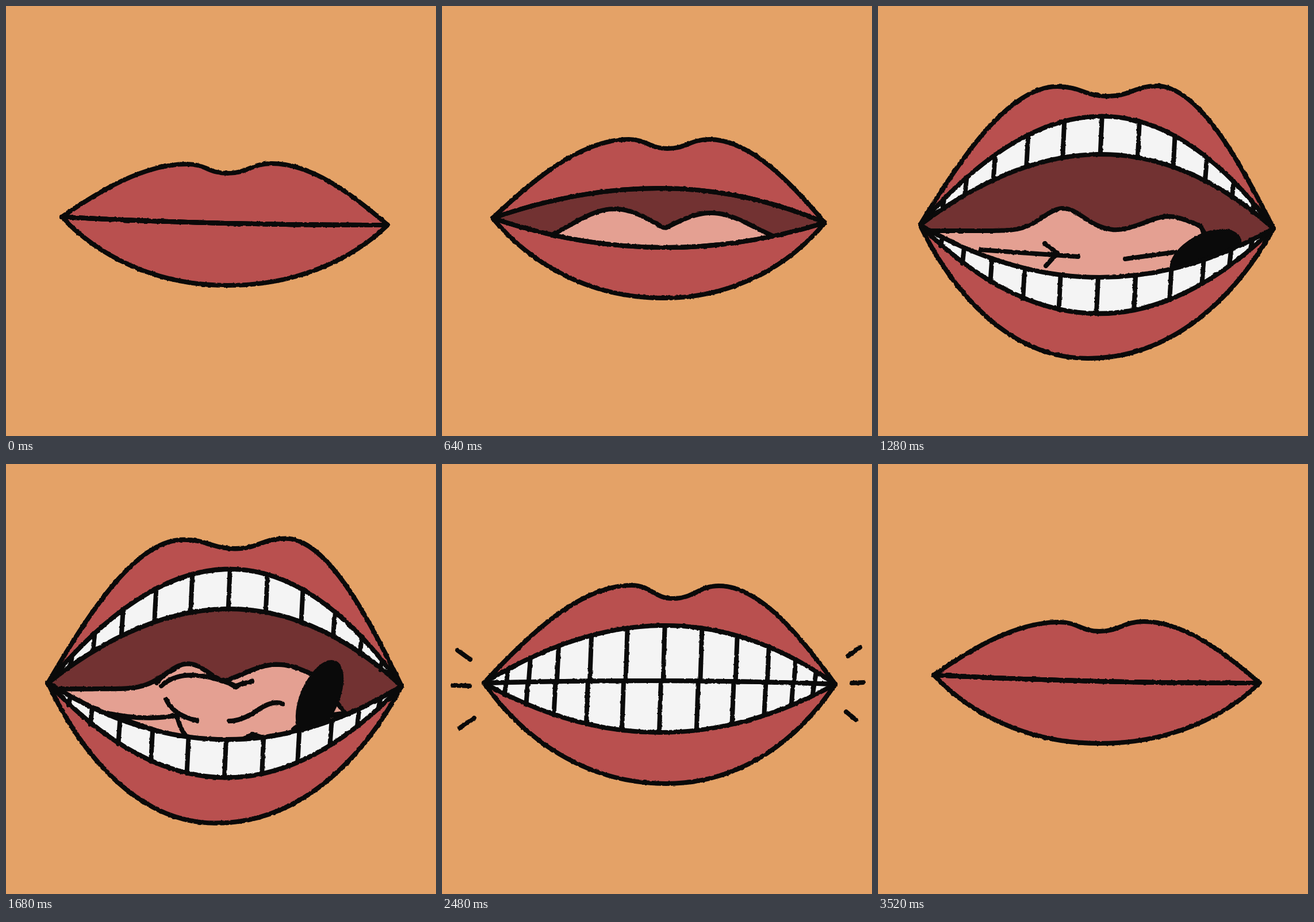
An HTML page for the animation above (3600 ms loop, 748x748 px).

```html
<!DOCTYPE html>
<html lang="en">
<head>
<meta charset="utf-8">
<title>Lips</title>
<style>
  html, body { margin: 0; height: 100%; overflow: hidden; background: #e4a267; }
  svg { display: block; width: 100vw; height: 100vh; }
  .ink { fill: none; stroke: #0a0a0a; stroke-width: 8; stroke-linecap: round; stroke-linejoin: round; }
  .lip { fill: #b9504f; }
  .dark { fill: #723232; }
  .skin { fill: #e4a092; }
  .tooth { fill: #f4f4f4; }
  .fine { stroke-width: 5; }
</style>
</head>
<body>
<svg viewBox="0 0 748 748">
  <filter id="rough" filterUnits="userSpaceOnUse" x="0" y="0" width="748" height="748" color-interpolation-filters="sRGB">
    <feTurbulence type="fractalNoise" baseFrequency=".15" numOctaves="2"/>
    <feDisplacementMap in="SourceGraphic" scale="3" xChannelSelector="R" yChannelSelector="G"/>
  </filter>
  <g id="art" filter="url(#rough)"></g>
</svg>
<script>
const LOOP = 3600, STEP = 80;
const art = document.getElementById('art');
const noise = document.querySelector('feTurbulence');

// x,y of left corner, right corner, left peak, dip, right peak, bottom;
// then the sag of upper gum, upper teeth, lower teeth, lower gum
const closed = [97, 367, 664, 381, 315, 275, 385, 291, 462, 274, 385, 486, 4, 4, 4, 4];
const parted = [88, 369, 666, 377, 325, 232, 392, 248, 465, 232, 385, 508, -56, -56, 47, 47];
const open = [73, 381, 688, 387, 312, 140, 400, 157, 485, 139, 365, 613, -192, -126, 88, 151];
const wide = [73, 381, 688, 385, 305, 140, 397, 153, 488, 137, 365, 621, -196, -128, 98, 163];
const smile = [73, 381, 684, 383, 330, 211, 402, 234, 482, 212, 390, 556, -101, -5, -5, 85];
const pout = [78, 374, 664, 386, 300, 260, 377, 280, 460, 258, 385, 509, -8, -8, -8, -8];
const mouthKeys = [[0, closed], [640, parted], [1280, open], [2160, wide], [2240, wide], [2400, smile],
  [2680, smile], [2880, pout], [3040, pout], [3360, closed]];

// base line, right end, then centre, height and width of two humps
const bodyKeys = [[640, [425, 620, 300, 72, 110, 468, 65, 110]],
  [1280, [391, 560, 322, 39, 50, 505, 25, 55]],
  [2000, [391, 525, 312, 45, 58, 445, 54, 110]]];
// centre, radii and angle
const hairKeys = [[640, [640, 500, 68, 38, -28]], [1280, [570, 434, 68, 38, -28]], [2000, [526, 383, 68, 30, -95]]];

const curled = 'M178 424Q265 430 348 436M290 413L312 430L292 452M430 440L517 428';
const stretched = `M262 381Q272 366 293 358M270 386Q310 350 400 386L428 378M378 376L400 388L412 381
  M278 408Q292 436 332 444M388 445Q410 445 437 427T481 416M172 431Q240 446 300 435
  M298 438Q305 468 325 480M185 435Q240 455 300 473M500 458Q540 436 590 432M408 478L428 467L450 474`;
const sparks = 'M27 324L49 340M19 385L48 386M31 459L56 442M706 334L727 319M713 381L733 380M703 431L720 445';

const lerp = (a, b, k) => a + (b - a) * k;
const path = (d, cls) => `<path class="${cls}" d="${d}"/>`;

function track(keys, t) {
  const i = keys.findIndex(key => key[0] > t);
  if (i === 0) return keys[0][1];
  if (i < 0) return keys[keys.length - 1][1];
  const [t0, a] = keys[i - 1], [t1, b] = keys[i];
  return a.map((v, j) => lerp(v, b[j], (t - t0) / (t1 - t0)));
}

// Cubic segment whose handles are given as fractions of the way from a to b
function arc(a, b, h1, h2) {
  const between = h => a.map((v, k) => lerp(v, b[k], h[k]));
  return `C${between(h1)} ${between(h2)} ${b}`;
}

function figure(t) {
  const [base, end, c1, h1, w1, c2, h2, w2] = track(bodyKeys, t);
  const hump = (x, c, h, w) => h * Math.exp(-(((x - c) / w) ** 2));
  let body = '';
  for (let x = 85; x <= end; x += 5) {
    body += `${body ? 'L' : 'M'}${x} ${base - Math.max(hump(x, c1, h1, w1), hump(x, c2, h2, w2))}`;
  }
  body += 'L590 432';

  const [x, y, rx, ry, angle] = track(hairKeys, t);
  const face = `<g transform="translate(${x - 31} ${y - 40})">
    <ellipse class="ink fine" rx="23" ry="27" style="fill:#e4a092"/>
    ${path('M-14 -10L-3 -13M7 -7L18 -4M-1 3L-5 11M-12 14L2 20', 'ink fine')}
    <circle cx="-8" cy="-3" r="3.5"/><circle cx="11" cy="6" r="3.5"/></g>`;
  return path(body + 'V560H85Z', 'skin') + path(body, 'ink') +
    (t >= 1040 ? path(t < 1600 ? curled : stretched, 'ink') : '') +
    `<ellipse rx="${rx}" ry="${ry}" fill="#0a0a0a" transform="translate(${x} ${y}) rotate(${angle})"/>` +
    (t >= 1760 ? face : '');
}

function draw(t) {
  const m = track(mouthKeys, t);
  const [left, right, peak1, dip, peak2, bottom] = [0, 2, 4, 6, 8, 10].map(i => m.slice(i, i + 2));
  const [upGum, upTeeth, lowTeeth, lowGum] = m.slice(12);
  const outline = `M${left}` +
    arc(left, peak1, [.3, .49], [.65, 1]) + arc(peak1, dip, [.45, 0], [.55, 1]) +
    arc(dip, peak2, [.45, 0], [.55, 1]) + arc(peak2, right, [.35, 0], [.7, .51]) +
    arc(right, bottom, [.21, .54], [.55, 1]) + arc(bottom, left, [.45, 0], [.79, .46]) + 'Z';

  // Inner curves hang from the corners; upward ones lean to the right
  const at = u => left.map((v, k) => lerp(v, right[k], u));
  const pull = (sag, i) => sag * 4 / 3 * (sag < 0 ? .93 + .14 * i : 1);
  const handle = (sag, i) => { const [x, y] = at((i + 1) / 3); return [x, y + pull(sag, i)]; };
  const edge = sag => `M${left}C${handle(sag, 0)} ${handle(sag, 1)} ${right}`;
  const area = (a, b) => `${edge(a)}C${handle(b, 1)} ${handle(b, 0)} ${left}Z`;
  const drop = (sag, u) => 3 * u * (1 - u) * lerp(pull(sag, 0), pull(sag, 1), u);

  function teeth(a, b, shift) {
    let gaps = '';
    for (let k = -5; k <= 5; k++) {
      const turn = .214 * k, u = .5 + .5 * Math.sin(turn) + shift * Math.cos(turn);
      const [x, y] = at(u), y0 = y + drop(a, u), y1 = y + drop(b, u);
      if (y1 - y0 > 6) gaps += `M${x} ${y0}L${x - 3} ${y1}`;
    }
    return path(area(a, b), 'tooth') + path(gaps, 'ink');
  }

  const swell = t > 1280 && t < 2160 ? 1 + .035 * Math.sin(Math.PI * (t - 1280) / 880) : 1;
  art.innerHTML = `<clipPath id="gape"><path d="${area(upTeeth, lowTeeth)}"/></clipPath>
    <g transform="translate(0 ${384 * (1 - swell)}) scale(1 ${swell})">
      ${path(outline, 'lip')}${path(area(upGum, lowGum), 'dark')}
      <g clip-path="url(#gape)">${figure(t)}</g>
      ${teeth(upGum, upTeeth, .015)}${teeth(lowTeeth, lowGum, .004)}
      ${[upGum, upTeeth, lowTeeth, lowGum].map(sag => path(edge(sag), 'ink')).join('')}
      ${path(outline, 'ink')}
    </g>
    ${t >= 2400 && t < 2720 ? path(sparks, 'ink') : ''}`;
  noise.setAttribute('seed', t / STEP + 1);
}

let last = -1;
function tick() {
  const t = Math.floor(performance.now() % LOOP / STEP) * STEP;
  if (t !== last) draw(last = t);
  requestAnimationFrame(tick);
}
tick();
</script>
</body>
</html>
```
